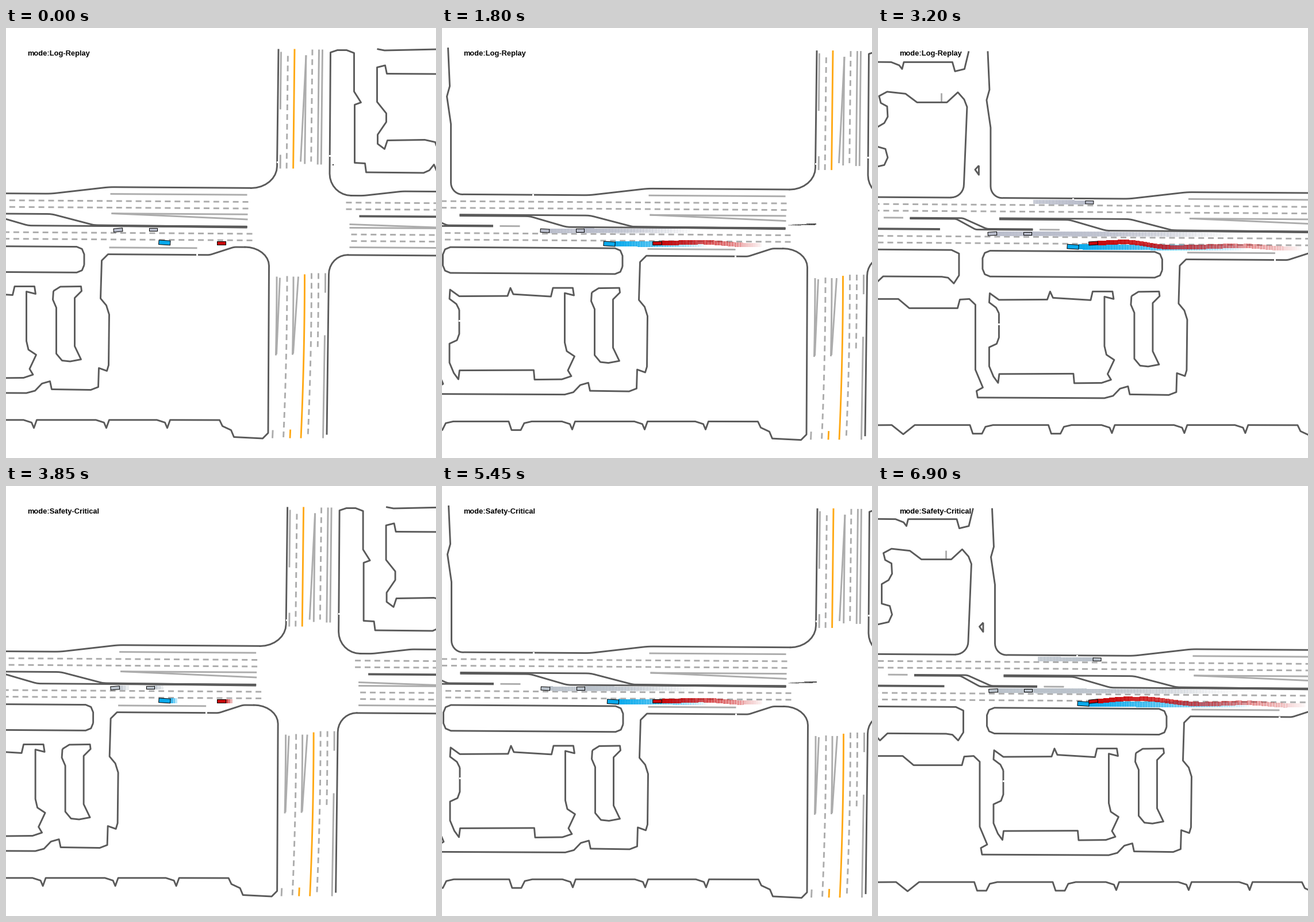
These frames come from a looping animation (748 px wide and 748 px high, 6.95 s). A matplotlib script:

```python
import numpy as np
import matplotlib.pyplot as plt
from matplotlib.animation import FuncAnimation
from matplotlib.collections import LineCollection, PolyCollection
from matplotlib.colors import to_rgb

SIZE, DPI = 748, 100
FRAMES, SWITCH = 139, 73
PX = 72 / DPI
SLOPE = .0067           # the main road falls slightly to the right

plt.rcParams["toolbar"] = "None"
fig = plt.figure(figsize=(SIZE / DPI, SIZE / DPI), dpi=DPI, facecolor="white")
ax = fig.add_axes([0, 0, 1, 1])
ax.axis("off")

curbs, medians, lanes, centre = [], [], [], []


# ---------------------------------------------------------------- helpers
def ramp(x, a, b, r=.15):
    """0 to 1 between a and b: straight, with rounded ends."""
    u = np.clip((x - a) / (b - a), 0, 1)
    low = np.minimum(u, 1 - u)
    v = np.where(low < r, low ** 2 / (2 * r), low - r / 2) / (1 - r)
    return np.where(u < .5, v, 1 - v)


def bend(y, x0, x1, *rises):
    """Line along the main road with rises (from, to, height)."""
    x = np.linspace(x0, x1, 120)
    return np.c_[x, y + SLOPE * x + sum(h * ramp(x, a, b) for a, b, h in rises)]


def arc(cx, cy, rx, ry, a0, a1):
    a = np.radians(np.linspace(a0, a1, 9))
    return np.c_[cx + rx * np.cos(a), cy + ry * np.sin(a)]


def curb(*parts):
    curbs.append(np.vstack(parts))


def rounded(x0, y0, x1, y1, r):
    spots = [(x1 - r, y1 - r), (x0 + r, y1 - r), (x0 + r, y0 + r), (x1 - r, y0 + r)]
    ring = np.vstack([arc(cx, cy, r, r, 90 * i, 90 * i + 90)[::4]
                      for i, (cx, cy) in enumerate(spots)])
    ring[:, 1] += SLOPE * ring[:, 0]
    curb(ring, ring[:1])


def dashes(line, start, end, period=16.9, on=10):
    for s in np.arange(start, end, period):
        lanes.append(line(np.array([s, min(s + on, end)])))


def row(y):
    return lambda x: np.c_[x, y + SLOPE * x]


def north(x):
    return lambda y: np.c_[x - .0115 * (y - 36), y]


def south(x):
    return lambda y: np.c_[x - 6.5 * ((y - 428) / 285) ** 2, y]


# ---------------------------------------------------------------- road map
# the four corners of the crossing
curb([(-168, 31), (-165, 98), (-170, 116), (-163, 164)],
     arc(-143, 266, 20, 20.4, 180, 90),
     bend(287.2, -141, 426, (69, 188, -12.2)),
     arc(426, 240, 45, 38, 90, 0), [(473.5, 36)])
curb([(749, 249), (744, 237), (736, 247), (726, 251.5), (626, 250.5),
      (624, 235), (606, 234), (606, 133), (617, 129), (605, 110), (605, 43),
      (592, 38), (576, 38), (564, 42)],
     arc(600, 253, 37.5, 38, 180, 90), bend(287, 600, 750, (615, 695, -8)))
curb([(557.5, 707)], arc(594, 428, 33, 33.8, 180, 270), bend(390.4, 594, 750))

# driveways dip below the southern curb
narrow = np.array([(-18, 0), (-4, 4.5), (0, 14), (5, 0)])
wide = np.array([(-13, 0), (-8, 15), (8, 15), (14, 3), (27, 0)])
vee = np.array([(-20, 0), (0, 16), (20, 0)])
dips = [dip + (x, 681.3) for x, dip in [(-315, vee), (-186, wide), (-49.5, wide),
                                        (48, narrow), (174, narrow), (280, narrow)]]
curb([(-430, 682)], *dips,
     [(371, 681.5), (376, 692), (391, 699), (396, 711), (446, 713.5), (455.5, 704)],
     arc(415, 413, 42, 32.5, 0, -90),
     bend(391.9, 415, 177, (350, 400, -14)),
     [(166, 404), (164, 470), (174, 482), (179, 498), (178, 586), (175, 596),
      (161, 591), (160, 624), (147, 629), (79, 628), (76, 614), (62, 618),
      (50, 630.5), (35, 634.5), (-185.5, 633.5), (-187.5, 622), (-176.5, 616),
      (-189.5, 585), (-189.5, 472), (-200, 462), (-216.5, 463), (-220.5, 478),
      (-304.5, 478), (-323.5, 462), (-430, 462)])

# blocks and buildings
rounded(-177, 379.2, 135.5, 424, 13)
curb(bend(378.3, -430, -231), [(-218, 383), (-218, 421), (-227, 435), (-237, 425)],
     bend(425, -248, -350), [(-363, 435), (-372, 425), (-430, 424)])
curb(bend(287.2, -430, -232), arc(-232, 263, 22.5, 22.5, 90, 0),
     [(-204, 128), (-209, 115), (-220, 102.5), (-239, 120), (-291, 120),
      (-311, 105), (-343, 101.5), (-357, 109), (-354, 121), (-343, 127),
      (-342, 145), (-348, 156), (-360, 163), (-360, 197), (-346, 201),
      (-342, 216), (-348, 229), (-366, 233), (-430, 240)])
curb([(-201, 31), (-208.5, 62), (-225, 66), (-229.5, 50), (-314, 50),
      (-317, 62), (-322, 55.5), (-336, 50), (-430, 49)])
curb([(-183.5, 230), (-190, 237), (-183.5, 246), (-183.5, 230)])
curb([(-148.5, 487), (-153.5, 477), (-165.5, 468), (-164.5, 452), (-148.5, 463.5),
      (-64.5, 463), (-59.5, 449), (-54.5, 460), (11, 464), (14.5, 449), (49, 449),
      (51, 462), (35, 458), (35, 544), (38.5, 559), (52, 568), (40.5, 592.5),
      (46.5, 602.5), (30, 608), (-17.5, 608.5), (-19, 592), (-148, 592.5),
      (-150, 608), (-158, 597), (-165.5, 579), (-165.5, 546), (-152.5, 540),
      (-148.5, 529), (-148.5, 487)])
curb([(82, 457), (94, 449.5), (130, 449), (131, 457), (119, 469), (119, 553),
      (130, 576), (111, 579.5), (97, 578), (87, 566), (87, 486), (81, 472), (82, 457)])
curb([(645, 36), (658, 38.5), (750, 36.5)])
curb([(750, 79.5), (662, 79), (659, 64.5), (645, 68), (645, 128), (661, 148),
      (661, 163), (646, 185), (646, 201), (658, 210), (663, 195), (728, 194),
      (746, 198), (750, 209)])

# medians
curb(bend(322.5, -148, 419, (72, 162, 19.5)))
curb(bend(324.5, -148, 419, (-32, 44, 18.4)))
curb(bend(322.8, -303.5, -89.5, (-215, -166, 18.4)))
curb(bend(324.2, -303.5, -89.5, (-226, -186, 18.3)))
medians += [[(150, 342.8), (419, 346.2)], bend(342.3, -430, -251), bend(322.8, 614, 750)]

# lane lines of the main road
for y, left, right in [(299.2, 421, 591), (310.7, 421, 591),
                       (354.6, 428, 600), (366.1, 428, 600)]:
    dashes(row(y), left - 10 - 50 * 16.9, left)
    dashes(row(y), right, 750)
for y, x0, x1 in [(286.9, 181, 419), (320.9, 183, 420), (380.1, 179, 332),
                  (343, 597, 750), (377, 597, 750), (341.9, -78, -43),
                  (322.8, -349, -315)]:
    lanes.append(bend(y, x0, x1))
lanes += [[(183, 322), (420, 332.5)], [(597, 341), (750, 346.5)],
          [(-248.5, 104), (-248.5, 120)]]

# crossing road
dashes(north(490), 48, 244)
dashes(north(532.5), 37, 232)
dashes(south(488.5), 431, 713)
dashes(south(531), 426, 706)
dashes(south(543), 426, 556)


def column(group, line, y0, y1):
    group.append(line(np.linspace(y0, y1, 30)))


for x, y0, y1 in [(478, 41, 141), (479, 220, 244), (521.5, 47, 236),
                  (544, 37, 237), (550, 37, 237)]:
    column(lanes, north(x), y0, y1)
for x, y0, y1 in [(470.5, 432, 569), (499.5, 432, 568), (555, 426, 460), (469.5, 699, 713)]:
    column(lanes, south(x), y0, y1)
lanes += [[(521.5, 47), (512, 232)], [(476, 434), (470, 567)],
          [(508, 432), (499, 566)], [(554, 534), (551, 713)]]
column(centre, north(501.5), 36, 244)
column(centre, south(519), 428, 713)
column(centre, south(500), 698, 713)

for group, color, width in [(lanes, "#acacac", 2.9), (centre, "#ffa914", 2.9),
                            (curbs, "#5a5a5a", 2.9), (medians, "#5a5a5a", 3.8)]:
    ax.add_collection(LineCollection(group, colors=color, linewidths=width * PX,
                                     capstyle="butt", joinstyle="round"),
                      autolim=False)
# joints where the mapped curbs do not quite meet
joints = [(471.5, 232.5), (563, 222), (-20, 287.2), (331.5, 394), (-148.5, 505.5)]
ax.scatter(*zip(*joints), s=(3 * PX) ** 2, marker="s", color="white",
           linewidths=0, zorder=2.5)


# ---------------------------------------------------------------- motion
def smooth(k, a, b):
    u = np.clip((k - a) / (b - a), 0, 1)
    return u * u * (3 - 2 * u)


class Mode:
    def __init__(self, name, grey, travel, blue, shifts):
        self.name, self.grey, self.travel, self.blue = name, grey, travel, blue
        self.shifts = [(9, 23, 4.3)] + shifts

    def camera(self, k):
        return (np.polyval(self.travel, k),
                sum(h * smooth(k, a, b) for a, b, h in self.shifts))


LOG = Mode("Log-Replay", "#b9bdcb", [-.00017, .04042, 3.7096, 0], [0, .0033, 4.4, 0],
           [(25, 41, -2.2), (45, 57, 9), (57, 70, -4)])
CRITICAL = Mode("Safety-Critical", "#b9c1ca", [-.000174, .04027, 3.7477, 0],
                [-.00024, .0245, 3.8, 0],
                [(25, 36, -1.9), (38, 54, 9.2), (56, 72, -7.5)])


def red(mode, k):
    dx, dy = mode.camera(k)
    ahead, behind = mode.camera(k + .5), mode.camera(k - .5)
    tilt = np.degrees(np.arctan2(ahead[1] - behind[1], ahead[0] - behind[0]))
    return 374 - dx, 374 - dy, tilt


def blue(mode, k):
    return 275.3 - np.polyval(mode.blue, k), 372.9 - .0004 * k * k, 3.5


def grey_back(mode, k):
    return 194.5 - 5.2 * k - .0053 * k * k, 351 - .04 * k, -5 * np.cos(k / 9)


def grey_front(mode, k):
    return 255.3 - 5.2 * k - .0053 * k * k, 350.2 - .034 * k, 0


def oncoming(mode, k):
    return 9 + 5.65 * (k - 64), 294 + .05 * (k - 64), 1


def walker(mode, k):
    return 427 + 1.72 * (k - 5), 340 - .07 * (k - 5), -3


def bystander(mode, k):
    return 568.3 + 0 * k, 238 + 0 * k, 0


# path, length, width, colour (None: grey of the mode), first and last step
ACTORS = [
    (bystander, 2, 2, "#303030", 0, 3),
    (walker, 7, 1.6, "#404040", 5, 33),
    (grey_back, 15.5, 6, None, 0, 99),
    (grey_front, 14, 5.4, None, 0, 99),
    (oncoming, 14, 5.4, None, 48, 99),
    (blue, 20, 7.6, "#08a9ec", 0, 99),
    (red, 15.5, 6, "#c80508", 0, 99),
]


def body(x, y, tilt, length, width):
    a = np.radians(tilt)
    u = np.array([-1, 1, 1, -1]) * length / 2
    v = np.array([-1, -1, 1, 1]) * width / 2
    return np.c_[x + u * np.cos(a) - v * np.sin(a), y + u * np.sin(a) + v * np.cos(a)]


def ribbon(x, y, length, width):
    """Quads between successive positions of the rear end."""
    x = x - np.sign(x[-1] - x[0]) * length / 2
    h = width / 2
    return np.stack([np.c_[x[:-1], y[:-1] - h], np.c_[x[1:], y[1:] - h],
                     np.c_[x[1:], y[1:] + h], np.c_[x[:-1], y[:-1] + h]], axis=1)


trails = PolyCollection([], zorder=3, linewidths=0, antialiaseds=False)
cars = PolyCollection([], zorder=4, edgecolors="black")
ax.add_collection(trails, autolim=False)
ax.add_collection(cars, autolim=False)
label = ax.text(37 / SIZE, 1 - 47.6 / SIZE, "", transform=ax.transAxes,
                family="Liberation Sans", weight="bold", size=12.9 * PX,
                color="black", va="baseline", zorder=5)


def draw(frame):
    mode, k = (LOG, frame) if frame < SWITCH else (CRITICAL, frame - SWITCH)
    dx, dy = mode.camera(k)
    ax.set_xlim(-dx - .5, SIZE - dx - .5)
    ax.set_ylim(SIZE - dy - .5, -dy - .5)
    label.set_text("mode:" + mode.name)

    strips, shades, bodies, fills, edges = [], [], [], [], []
    for path, length, width, color, first, last in ACTORS:
        if k < first:
            continue
        rgb = to_rgb(color or mode.grey)
        steps = np.arange(first, min(k, last) + 1)
        x, y, _ = path(mode, steps)
        strips.extend(ribbon(x, y, length, width + 1 if width > 2 else width))
        shades += [(*rgb, (s / k) ** .9) for s in steps[:-1]]
        if k <= last:
            bodies.append(body(*path(mode, k), length, width))
            fills.append(rgb)
            edges.append(PX if width > 2 else 0)
    trails.set_verts(strips)
    trails.set_facecolor(shades)
    cars.set_verts(bodies)
    cars.set_facecolor(fills)
    cars.set_linewidth(edges)
    return trails, cars, label


anim = FuncAnimation(fig, draw, frames=FRAMES, interval=50, repeat=True,
                     repeat_delay=0, blit=False)
plt.show()
```
